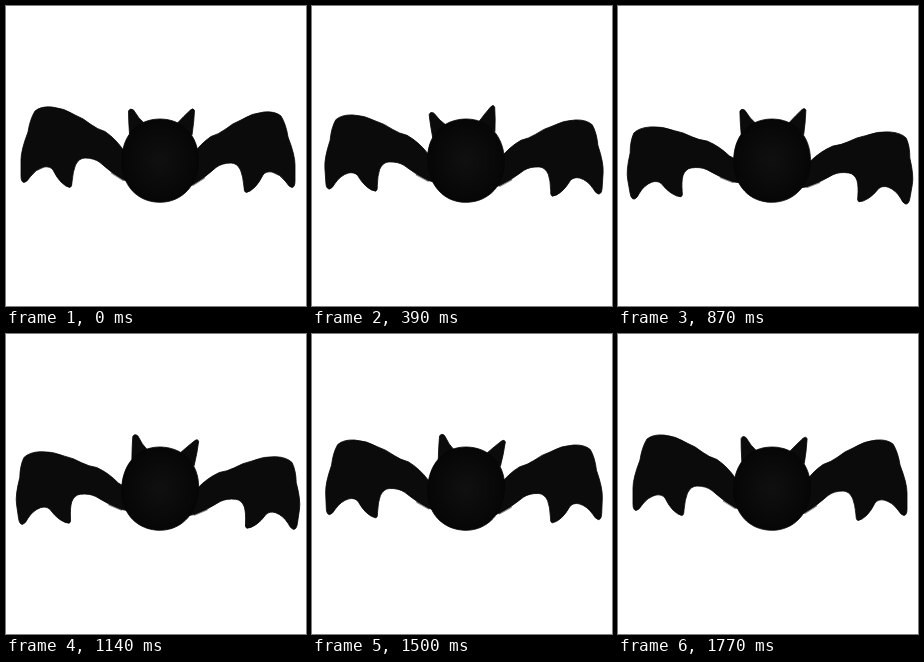
Write an HTML page that moves like this. It is 300 px wide and 300 px high and loops after 1800 ms.

```html
<!DOCTYPE html>
<html lang="en">
<head>
<meta charset="utf-8">
<title>Flapping bat</title>
<style>
  html, body { margin: 0; width: 100%; height: 100%; overflow: hidden; background: #fff; }
  svg { display: block; width: 100%; height: 100%; }
  .fur { fill: #0b0b0b; stroke: #060606; stroke-width: .8; stroke-linejoin: round; }
  .face { fill: url(#shade); }
</style>
</head>
<body>
<svg viewBox="0 0 300 300">
  <defs>
    <radialGradient id="shade">
      <stop offset="0" stop-color="#101010"/>
      <stop offset="1" stop-color="#060606"/>
    </radialGradient>
    <g id="wing">
      <path d="M106 167 L117 174" stroke="#888" stroke-width="2" stroke-linecap="round"/>
      <path class="fur" d="M135 160 L118 145 Q110 133 99 125.5 Q91 123 85 118.5 Q77 112 69 109
        Q58 102 46 101 Q35 100 29 105 Q24 113 22 126 Q15 144 15 154 L15 170
        Q15 176 18 176.500 Q21 176 24 171 Q30 163 38 161 Q44 160 47 164 Q51 172 55 176
        Q60 181 64 181.5 Q66 181 66 176 Q67 165 69.500 159 Q73 152 79 152
        Q88 152 94 156.5 Q104 166 118 174 L135 180 Z"/>
    </g>
  </defs>
  <g id="leftWing"><use href="#wing"/></g>
  <g transform="translate(304 5) scale(-1 1)">
    <g id="rightWing"><use href="#wing"/></g>
  </g>
  <g id="head">
    <path class="fur" d="M123.500 128 Q122.5 114 122.5 105 Q124 101.500 127.500 104 Q132 112 139 118 Z"/>
    <path class="fur" d="M186 129 Q188 116 188.5 104.500 Q187.500 101.500 184.5 104 Q178 110 171.500 117 Z"/>
    <path class="fur face" d="M154 113 C177 113 192.500 130 192.5 154 C192.5 179 176 196.3 154 196.300
      C131 196.300 115.7 179 115.700 155 C115.700 130 131 113 154 113 Z"/>
  </g>
</svg>
<script>
  const LOOP = 1800, STEP = 30, TILT = 6.5;
  const byId = id => document.getElementById(id);
  const wings = [byId('leftWing'), byId('rightWing')];
  const head = byId('head');

  // Swings the wing down around its shoulder while flattening it a little.
  function wingMatrix(k) {
    return `matrix(1 ${-.15 * k} ${.16 * k} ${1 - .1 * k} ${-30 * k} ${37 * k})`;
  }

  function draw(now) {
    const time = Math.floor((now % LOOP) / STEP) * STEP;
    const phase = time / LOOP * 2 * Math.PI;
    const flap = wingMatrix((1 - Math.cos(phase)) / 2);
    for (const wing of wings) wing.setAttribute('transform', flap);
    head.setAttribute('transform', `rotate(${-TILT * Math.sin(phase)} 154 155)`);
  }

  const start = performance.now();
  function tick() {
    draw(performance.now() - start);
    requestAnimationFrame(tick);
  }
  tick();
</script>
</body>
</html>
```
